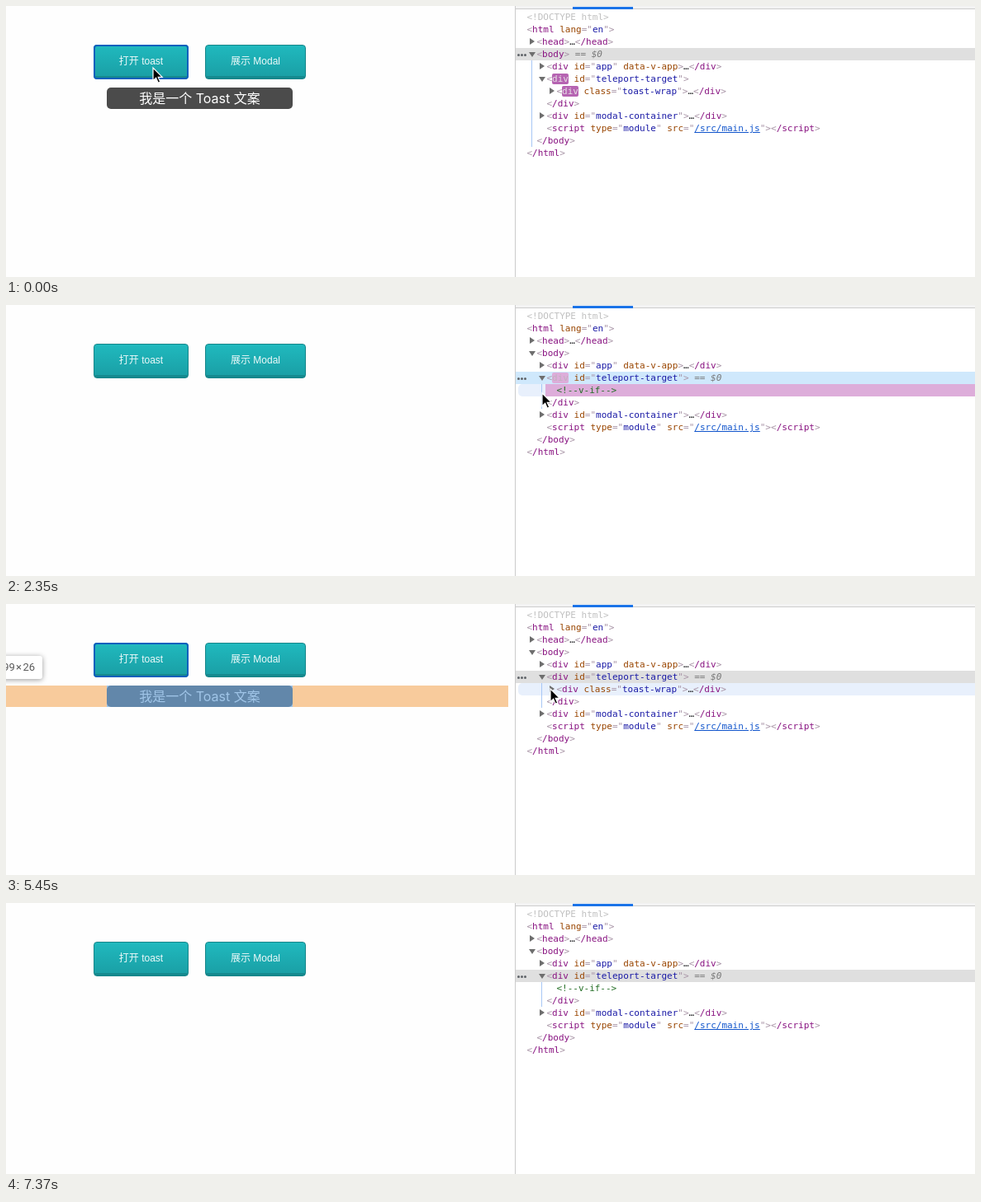
An HTML page that plays this animation: 1173 by 329 pixels, repeating every 8070 ms.

```html
<!DOCTYPE html>
<html lang="zh">
<head>
<meta charset="utf-8">
<style>
html, body { margin: 0; width: 100%; height: 100%; overflow: hidden; background: #fefefe; }
#stage { position: relative; width: 1173px; height: 329px; overflow: hidden; background: #fefefe; }
#stage div, #stage svg { position: absolute; box-sizing: border-box; white-space: pre; }
#stage .btn {
  top: 47px; height: 42px; border: 1px solid #17868a; border-radius: 4px;
  background: linear-gradient(#20b9be, #1aa0a6 37px, #15898e 37px);
  color: #eefafa; font: 12px/38px "Liberation Sans", "Noto Sans CJK SC", sans-serif; text-align: center;
}
#stage .focus { outline: 2px solid #0a60bd; outline-offset: -2px; }
#toast {
  left: 122px; top: 99px; width: 225px; height: 26px; border-radius: 5px; background: #4b4b4b;
  color: #fff; font: 16px/26px Inter, "Noto Sans CJK SC", sans-serif; text-align: center;
}
#overlay { left: 0; top: 0; width: 616px; height: 329px; overflow: hidden; }
.margin { top: 99px; height: 26px; background: rgba(246, 178, 107, .66); }
.content { left: 122px; top: 99px; width: 225px; height: 26px; background: rgba(111, 168, 220, .66); }
.tip {
  right: 572px; top: 63px; height: 28px; padding: 0 9px; border-radius: 3px; background: #fff;
  box-shadow: 0 1px 6px rgba(0, 0, 0, .4); color: #5a5a5a; font: 13px/28px Roboto, sans-serif;
}
#panel { left: 616px; top: 0; width: 557px; height: 329px; border-left: 1px solid #ccc; background: #fff; }
#bar { left: 617px; top: 0; width: 556px; height: 4px; background: #f3f3f3; border-bottom: 1px solid #ccc; }
#tab { left: 686px; top: 1px; width: 73px; height: 3px; background: #1a73e8; }
#tree { left: 0; top: 0; width: 1173px; height: 329px; font: 11px/15px "DejaVu Sans Mono", monospace; color: #a894a6; }
.row { height: 15px; }
.sel { left: 617px; width: 556px; height: 15px; }
.hover { left: 620px; width: 553px; height: 15px; background: #e8f0fc; border-radius: 5px 0 0 5px; }
.line { width: 1px; background: #a8c7f5; }
.dot { width: 3px; height: 3px; border-radius: 50%; background: #5f6368; }
.arrow { background: #6e6e6e; }
.shut { width: 6px; height: 8px; clip-path: polygon(0 0, 100% 50%, 0 100%); }
.open { width: 8px; height: 6px; clip-path: polygon(0 0, 100% 0, 50% 100%); }
.t { color: #881280; } .a { color: #994500; } .v { color: #1a1aa6; }
.c { color: #236e25; } .x { color: #202124; } .d { color: #c0c0c0; }
.u { color: #1155cc; text-decoration: underline; }
.e { color: #777; font-style: italic; }
.flash { border-radius: 2px; }
</style>
</head>
<body>
<div id="stage">
  <div class="btn" id="open" style="left:106px;width:115px">打开 toast</div>
  <div class="btn" style="left:241px;width:122px">展示 Modal</div>
  <div id="toast">我是一个 Toast 文案</div>
  <div id="overlay">
    <div class="margin" style="left:0;width:122px"></div>
    <div class="margin" style="left:347px;width:261px"></div>
    <div class="content"></div>
    <div class="tip">div.toast-wrap  224.99&#8202;×&#8202;26</div>
  </div>
  <div id="panel"></div>
  <div id="bar"></div>
  <div id="tab"></div>
  <div id="tree"></div>
  <svg id="cursor" width="20" height="26" viewBox="-3 -3 20 26" style="left:0;top:0">
    <path d="M0 0V15.6L3.6 12.3 6.2 18.2 8.7 17.1 6.2 11.4H11.2Z" fill="#000" stroke="#fff" stroke-width="1.2"/>
  </svg>
</div>
<script>
const LOOP = 8070, TICK = 147.5;
const $ = id => document.getElementById(id);
const within = (n, ...spans) => spans.some(([a, b]) => n >= a && n <= b);

// tick, x, y of the pointer tip
const path = [
  [0, 178, 75], [2, 215, 92], [4, 430, 114], [6, 628, 115], [7, 660, 104], [8, 673, 89],
  [9, 684, 106], [13, 684, 106], [16, 649, 107], [19, 649, 106], [20, 640, 98], [22, 470, 86],
  [24, 260, 66], [26, 176, 69], [29, 176, 69], [31, 400, 110], [33, 620, 131], [35, 650, 126],
  [36, 655, 110], [37, 659, 103], [40, 659, 103], [41, 680, 108], [42, 699, 113],
  [43, 716, 150], [45, 745, 215], [46, 760, 266]
];
// last tick, hovered node
const hovers = [[6, ''], [12, 'toast'], [20, 'note'], [32, ''], [35, 'modal'],
  [40, 'toast'], [42, 'note'], [43, 'end'], [44, 'script']];
const flashes = [-100, 1950, 4095, 6090];

function pointer(n) {
  const i = path.findIndex(p => p[0] >= n);
  if (i < 0) return null;
  if (!i) return path[0].slice(1);
  const [a, b] = [path[i - 1], path[i]], k = (n - a[0]) / (b[0] - a[0]);
  return [1, 2].map(j => a[j] + (b[j] - a[j]) * k);
}

// cubic-bezier(0, 0, .2, 1)
function ease(x) {
  let lo = 0, hi = 1;
  for (let i = 0; i < 24; i++) {
    const s = (lo + hi) / 2;
    if (.6 * (1 - s) * s * s + s ** 3 < x) lo = s; else hi = s;
  }
  return 3 * (1 - lo) * lo * lo + lo ** 3;
}
const mix = (a, b, k) => a.map((v, i) => v + (b[i] - v) * k);
const rgba = (c, alpha = 1) => `rgba(${c.map(Math.round)},${alpha})`;

function flashColors(n) {
  const time = n * 147.4;
  const start = flashes.filter(s => s <= time + 60).pop();
  const age = Math.max(0, time - start);
  if (age >= 1270) return null;
  const grey = [168, 148, 166], pale = [245, 219, 244];
  if (age < 1120) {
    const k = ease(age / 1120);
    return { bg: rgba(mix([158, 54, 153], pale, k)), fg: rgba(mix([255, 255, 255], grey, k)) };
  }
  const k = ease((age - 1120) / 150);
  return { bg: rgba(pale, 1 - k), fg: rgba(mix(grey, [136, 18, 128], k)) };
}

const span = (cls, text) => `<span class="${cls}">${text}</span>`;
const attr = (name, value, cls = 'v') =>
  ' ' + span('a', name) + (value ? `="${span(cls, value)}"` : '');
const start = (tag, attrs = '') => `&lt;${tag.startsWith('<') ? tag : span('t', tag)}${attrs}&gt;`;
const end = tag => `&lt;${span('t', '/' + tag)}&gt;`;
const dots = span('x', '…');

function rows(toast, expanded, fl) {
  const div = fl ? `<span class="flash" style="background:${fl.bg};color:${fl.fg}">div</span>` : 'div';
  const wrap = start(div, attr('class', 'toast-wrap'));
  const list = [
    [0, span('d', '&lt;!DOCTYPE html&gt;')],
    [0, start('html', attr('lang', 'en'))],
    [1, start('head') + dots + end('head'), 'shut'],
    [1, start('body'), 'open', 'body'],
    [2, start('div', attr('id', 'app') + attr('data-v-app')) + dots + end('div'), 'shut'],
    [2, start(div, attr('id', 'teleport-target')), 'open', 'target']
  ];
  if (!toast) list.push([3, span('c', '&lt;!--v-if--&gt;'), '', 'note']);
  else if (!expanded) list.push([3, wrap + dots + end('div'), 'shut', 'toast']);
  else list.push(
    [3, wrap, 'open', 'toast'],
    [4, start('div', attr('class', 'toast-msg')) + span('x', '我是一个 Toast 文案') + end('div')],
    [3, end('div')]);
  list.push(
    [2, end('div'), '', 'end'],
    [2, start('div', attr('id', 'modal-container')) + dots + end('div'), 'shut', 'modal'],
    [2, start('script', attr('type', 'module') + attr('src', '/src/main.js', 'u')) + end('script'), '', 'script'],
    [1, end('body')],
    [0, end('html')]);
  return list;
}

const box = (cls, x, y, style = '', text = '') =>
  `<div class="${cls}" style="left:${x}px;top:${y}px;${style}">${text}</div>`;

function tree(n, toast) {
  const fl = flashColors(n);
  const picked = n < 11 ? 'body' : n < 13 ? 'toast' : 'target';
  const active = within(n, [11, 27]);
  const hover = (hovers.find(h => h[0] >= n) || [0, ''])[1];
  const list = rows(toast, within(n, [39, 40]), fl);
  let back = '', front = '';
  list.forEach(([depth, html, arrow, id], i) => {
    const y = 6 + 15 * i, x = 630.4 + 12 * depth;
    if (id && id === picked) {
      back += box('sel', 617, y, `background:${active ? '#cfe8fc' : '#dfdfdf'}`);
      for (let k = 0; k < 3; k++) front += box('dot', 619 + 4 * k, y + 7);
      html += span('e', ' == $0');
    } else if (id && id === hover) back += box('hover', 620, y);
    if (id === 'note' && fl) back += box('row', 653, y, `width:520px;background:${fl.bg}`);
    if (arrow === 'shut') front += box('arrow shut', x - 8.4, y + 3);
    if (arrow === 'open') front += box('arrow open', x - 9.4, y + 5);
    front += box('row', x, y, '', html);
  });
  const bottom = 6 + 15 * list.length;
  if (picked === 'body') back += box('line', 636, 66, `height:${bottom - 81}px`);
  if (picked === 'target') back += box('line', 648, 96, `height:${bottom - 156 + 0 + 0 + 0 + 0 + 0 + 0 + 0 + 0 - 0}px`.replace(/.*/s, `height:${bottom - 156}px`));
  return back + front;
}

const show = (id, on) => { $(id).style.visibility = on ? 'visible' : 'hidden'; };

function draw(n) {
  const toast = within(n, [0, 12], [28, 40]);
  show('toast', toast);
  show('overlay', within(n, [7, 12], [36, 40]));
  $('open').classList.toggle('focus', within(n, [0, 10], [28, 38]));
  $('tree').innerHTML = tree(n, toast);
  const p = pointer(n);
  show('cursor', p);
  if (p) $('cursor').style.transform = `translate(${p[0] - 3}px,${p[1] - 3}px)`;
}

let last = -1;
function frame() {
  const n = Math.min(50, Math.floor((performance.now() % LOOP + 10) / TICK));
  if (n !== last) draw(last = n);
  requestAnimationFrame(frame);
}
frame();
</script>
</body>
</html>
```
